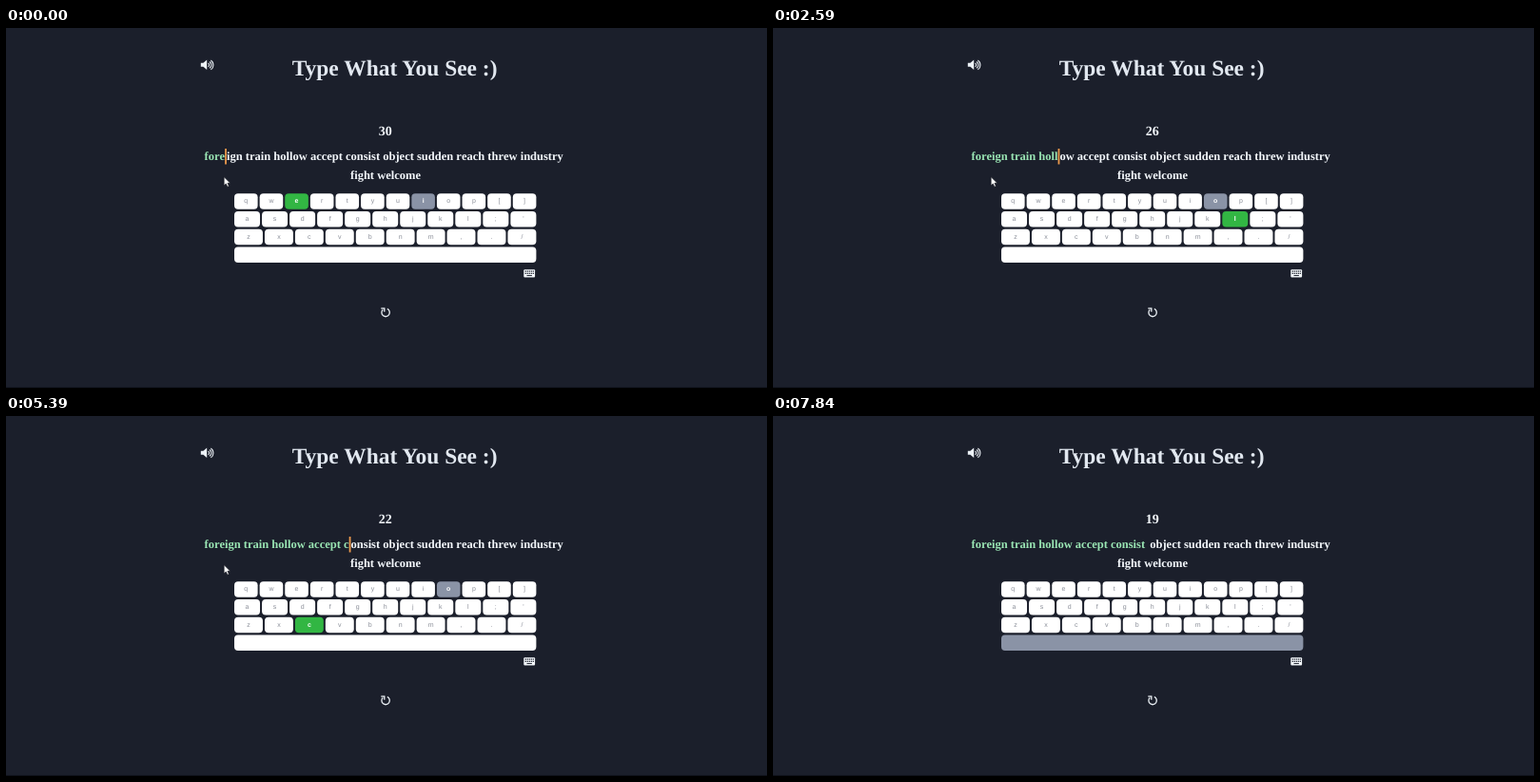
An HTML page that plays this animation: 800x379 px, repeating every 7.91 s.

```html
<!DOCTYPE html>
<html lang="en">
<head>
<meta charset="utf-8">
<title>Type What You See</title>
<style>
  html, body { margin: 0; width: 100%; height: 100%; overflow: hidden; background: #1b1f2b; }
  svg { display: block; }
  text { font-family: "Liberation Serif", "Times New Roman", serif; font-weight: bold; fill: #f4f8fc; text-rendering: geometricPrecision; white-space: pre; }
  .title { font-size: 23.44px; fill: #e2e8f0; text-anchor: middle; }
  .timer { font-size: 14px; text-anchor: middle; }
  .words { font-size: 12.5px; font-kerning: none; font-variant-ligatures: none; }
  .typed { fill: #9ae6b4; }
  .wrong { fill: #f08080; }
  .key rect { fill: #fff; }
  .key text { font: 7px "Liberation Sans", Arial, sans-serif; fill: #8b8f99; text-anchor: middle; }
  .next rect { fill: #8a93a6; }
  .hit rect { fill: #32b643; }
  .next text, .hit text { fill: #fff; font-weight: bold; }
  .line { fill: none; stroke: #edf2f7; }
</style>
</head>
<body>
<svg width="800" height="379" viewBox="0 0 800 379">
  <rect y="378" width="800" height="1" fill="#10131b"/>
  <path fill="#edf2f7" d="M204.8 36.8h2.6l3.8-3.2v10.4l-3.8-3.2h-2.6z"/>
  <path class="line" stroke-width="1.1" d="M212.6 37a2.3 2.3 0 0 1 0 3.8M214 35.5a4 4 0 0 1 0 6.8M215.4 34a6 6 0 0 1 0 9.8"/>
  <text class="title" x="408.6" y="50">Type What You See :)</text>
  <text class="timer" id="timer" x="398.8" y="112.5"></text>
  <text class="words" x="208.5" y="138.5"><tspan class="typed" id="typed"></tspan><tspan class="wrong" id="wrong"></tspan><tspan id="rest" dx="2"></tspan></text>
  <text class="words" x="362" y="158.5">fight welcome</text>
  <rect id="caret" y="127" width="1.8" height="16.5" fill="#ed9a4d"/>
  <g id="keys"></g>
  <rect x="544.3" y="254.2" width="11.8" height="8.2" rx="1" fill="#f4f8fc"/>
  <path stroke="#1b1f2b" stroke-width="1.2" stroke-dasharray="1.2 .8" d="M545.7 256.2h9.4M545.7 258.3h9.4"/>
  <path stroke="#1b1f2b" d="M547.5 260.6h5.4"/>
  <path class="line" stroke-width="1.3" d="M400.8 295.7A4.2 4.2 0 1 1 396.2 296.5M394.3 295.2h3.5v3.5"/>
  <path id="pointer" fill="#fff" stroke="#11141c" stroke-width=".6" d="M0 0v9l2.1-1.9 1.5 3.3 1.6-.7-1.5-3.2h2.8z"/>
</svg>
<script>
const LOOP = 7910, TICK = 700, FLASH = 120;
const line = "foreign train hollow accept consist object sudden reach threw industry";
const $ = id => document.getElementById(id);
const keys = {};

["qwertyuiop[]", "asdfghjkl;'", "zxcvbnm,./", " "].forEach((row, r) => {
  const pitch = (317.4 + 2) / row.length, y = 174.2 + r * 18.75;
  [...row].forEach((char, i) => {
    const x = 240 + i * pitch, w = pitch - 2;
    $("keys").insertAdjacentHTML("beforeend",
      `<g class="key"><rect x="${x}" y="${y}" width="${w}" height="16.6" rx="4"/><text x="${x + w / 2}" y="${y + 10.2}">${char}</text></g>`);
    keys[char] = $("keys").lastElementChild;
  });
});

// Key presses: first character, start time, interval, amount
const presses = [];
function type(first, start, step, amount) {
  for (let i = 0; i < amount; i++) presses.push({ at: start + i * step, count: first + i + 1, key: line[first + i] });
}
type(3, 0, 0, 1);
type(4, 210, 0, 1);
type(5, 1050, 105, 8);
type(13, 1960, 150, 8);
presses.push({ at: 3160, count: 22, wrong: 1 }, { at: 3650, count: 21 });
type(21, 3850, 215, 8);
type(29, 5560, 200, 6);

function draw(t) {
  const last = presses.filter(p => p.at <= t).pop();
  const { count, wrong = 0 } = last;
  $("timer").textContent = 30 - Math.floor(t / TICK + .7);
  $("typed").textContent = line.slice(0, count - wrong);
  $("wrong").textContent = line.slice(count - wrong, count);
  $("rest").textContent = line.slice(count);

  const hit = t - last.at < FLASH ? last.key : "";
  for (const char in keys)
    keys[char].setAttribute("class", "key" + (char === hit ? " hit" : char === line[count] ? " next" : ""));

  const width = $("typed").parentNode.getSubStringLength(0, count);
  const offPeak = Math.abs((t / TICK + .67) % 1 - .5);
  $("caret").setAttribute("x", 208.6 + width);
  $("caret").setAttribute("opacity", Math.max(0, Math.min(1, (.33 - offPeak) / .15)));

  const leave = Math.max(0, (t - 6650) / 280) ** 2;
  $("pointer").setAttribute("transform", `translate(${229.2 + 79 * leave} ${156.8 - 161 * leave})`);
}

function frame() {
  draw(performance.now() % LOOP);
  requestAnimationFrame(frame);
}
frame();
</script>
</body>
</html>
```
